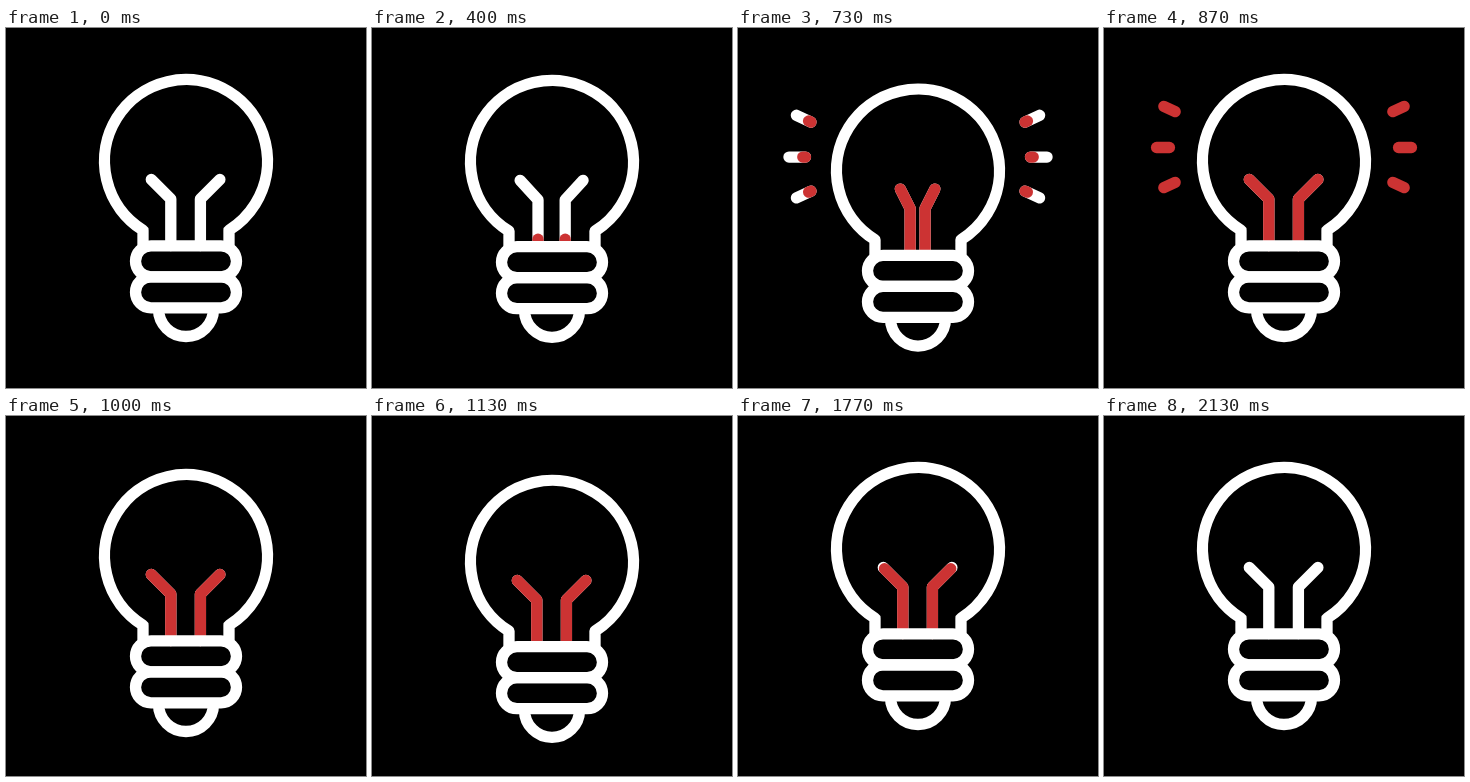
An HTML page with a canvas for the animation above (2500 ms loop, 360x360 px).

```html
<!DOCTYPE html>
<html lang="en">
<head>
<meta charset="utf-8">
<title>Light bulb</title>
<style>
  html, body { margin: 0; width: 100%; height: 100%; overflow: hidden; background: #000; }
  canvas { display: block; width: 100vw; height: 100vh; }
</style>
</head>
<body>
<canvas id="stage" width="360" height="360"></canvas>
<script>
const ctx = document.getElementById('stage').getContext('2d');
const LOOP = 2500, WHITE = '#fff', RED = '#cc3333';

// Outer and inner ends of the left rays
const RAYS = [
  [[58, 77.5], [73, 84.5]],
  [[50.5, 119.5], [67.5, 119.5]],
  [[58, 160.5], [73, 153.5]]
];

const linear = (t, a, b) => Math.min(1, Math.max(0, (t - a) / (b - a)));
const ease = (t, a, b) => (1 - Math.cos(Math.PI * linear(t, a, b))) / 2;
const dip = (t, a, peak, b) => ease(t, a, peak) - ease(t, peak, b);
const mix = (p, q, k) => [p[0] + (q[0] - p[0]) * k, p[1] + (q[1] - p[1]) * k];

function line(points, color) {
  ctx.strokeStyle = color;
  ctx.beginPath();
  points.forEach(p => ctx.lineTo(p[0], p[1]));
  ctx.stroke();
}

function bothSides(points, color, axis = 180) {
  line(points, color);
  line(points.map(([x, y]) => [2 * axis - x, y]), color);
}

function filament(squeeze, fill) {
  const axis = 179.6;
  const x = d => axis - d * (1 - squeeze);
  const base = [x(14.8), 217.5], elbow = [x(14.8), 171], tip = [x(34.3), 151.5];
  bothSides([base, elbow, tip], WHITE, axis);
  if (fill <= 0) return;
  const stem = 46.5, total = stem + 27.6, len = fill * total;
  bothSides(len <= stem
    ? [base, mix(base, elbow, len / stem)]
    : [base, elbow, mix(elbow, tip, (len - stem) / (total - stem))], RED, axis);
}

function rays(t) {
  const grow = ease(t, 440, 765);
  const paint = ease(t, 695, 830);
  const shrink = linear(t, 830, 1000);
  if (grow <= 0 || shrink >= 1) return;
  for (const [outer, inner] of RAYS) {
    const a = mix(inner, outer, shrink / 2);
    const b = mix(inner, outer, grow - shrink / 2);
    if (paint < 1) bothSides([a, b], WHITE);
    if (paint > 0) bothSides([a, mix(a, b, paint)], RED);
  }
}

function capsule(y) {
  ctx.beginPath();
  ctx.arc(145, y, 15.5, Math.PI / 2, Math.PI * 1.5);
  ctx.arc(215, y, 15.5, -Math.PI / 2, Math.PI / 2);
  ctx.closePath();
  ctx.stroke();
}

function bulb() {
  const angle = Math.acos(43 / 81.5);
  ctx.strokeStyle = WHITE;
  ctx.beginPath();
  ctx.moveTo(137, 217);
  ctx.arc(180, 133, 81.5, Math.PI - angle, angle);
  ctx.lineTo(223, 217);
  ctx.stroke();
  capsule(233.3);
  capsule(264.3);
  ctx.beginPath();
  ctx.arc(180, 281, 27.5, 0, Math.PI);
  ctx.stroke();
}

function draw(t) {
  const drop = 11.5 * dip(t, 340, 680, 870) + 13 * dip(t, 870, 1120, 1300);
  const squeeze = 0.64 * dip(t, 320, 667, 870);
  ctx.setTransform(1, 0, 0, 1, 0, 0);
  ctx.fillStyle = '#000';
  ctx.fillRect(0, 0, 360, 360);
  ctx.translate(0, drop);
  ctx.lineWidth = 11.3;
  ctx.lineCap = ctx.lineJoin = 'round';
  filament(squeeze, ease(t, 325, 700) - ease(t, 1733, 2130));
  rays(t);
  bulb();
}

const start = performance.now();
function tick() {
  draw((performance.now() - start) % LOOP);
  requestAnimationFrame(tick);
}
tick();
</script>
</body>
</html>
```
